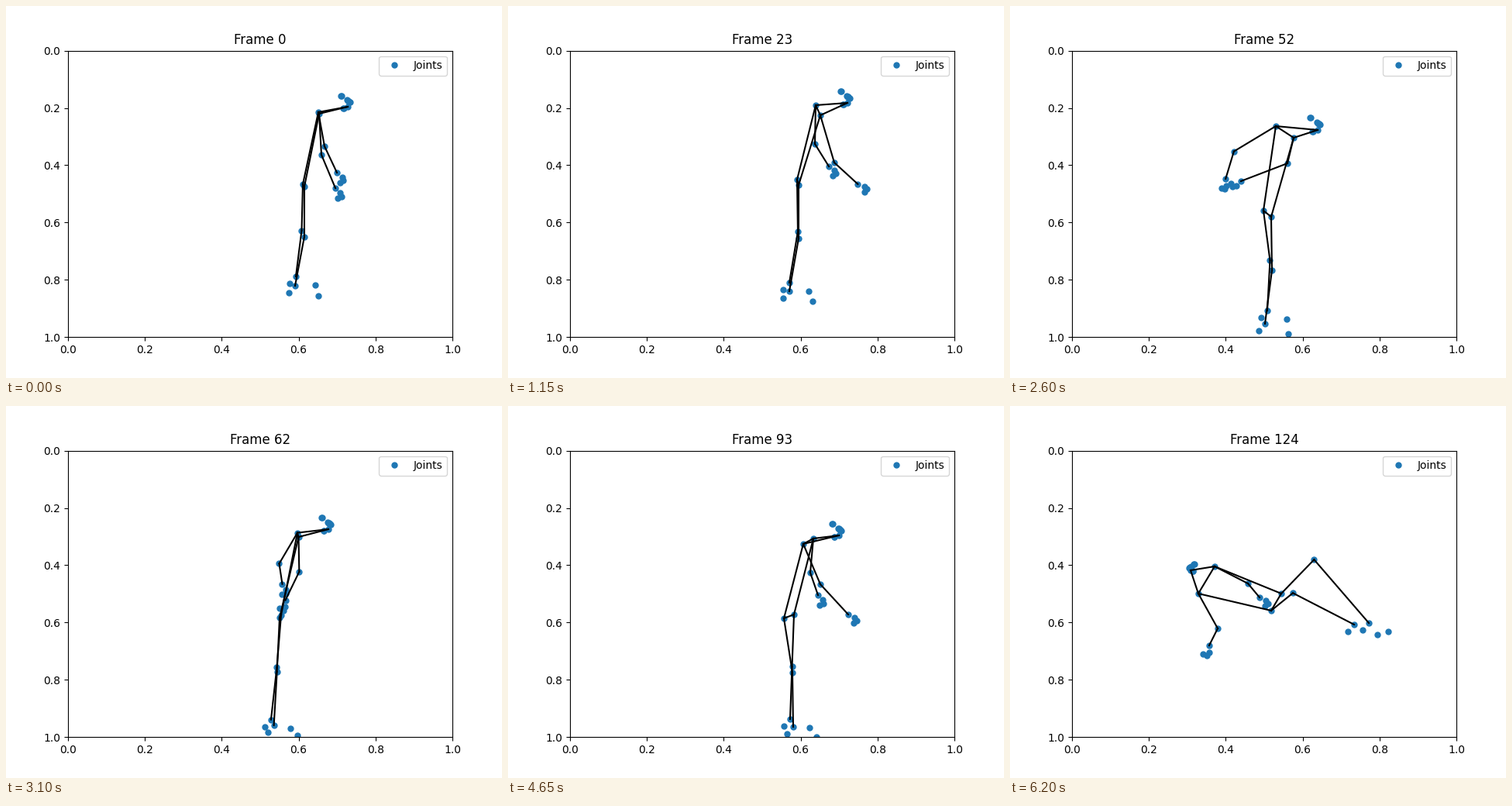
A matplotlib script that plays this animation: 640 by 480 pixels, repeating every 6.25 s.

```python
import numpy as np
import matplotlib.pyplot as plt
from matplotlib.animation import FuncAnimation

FRAMES, INTERVAL = 125, 50
KEYS = np.array([0, 23, 52, 72, 93, 105, 124.0])
T = np.arange(FRAMES)
jump = np.clip((T - KEYS[-2]) / (KEYS[-1] - KEYS[-2]), 0, 1)
leap = np.sin(np.pi * jump)
planted = np.where(jump > 0, KEYS[-2] + (KEYS[-1] - KEYS[-2]) * jump ** 4, T)


def ease(vals, t=T):
    """Monotone cubic through one value per key time."""
    v, h = np.array(vals, float), np.diff(KEYS)
    d = np.diff(v) / h
    a, b = d[:-1], d[1:]
    same = a * b > 0
    mid = np.where(same, 2 * a * b / np.where(same, a + b, 1), 0)
    m = np.concatenate(([d[0]], mid, [d[-1]]))
    i = np.clip(np.searchsorted(KEYS, t, side="right") - 1, 0, len(h) - 1)
    s = (t - KEYS[i]) / h[i]
    return ((1 + 2 * s) * (1 - s) ** 2 * v[i] + s * (1 - s) ** 2 * h[i] * m[i]
            + s * s * (3 - 2 * s) * v[i + 1] + s * s * (s - 1) * h[i] * m[i + 1])


def track(*points, lift=0, t=T):
    """Path through stage pixels, raised by lift while leaping."""
    x, y = zip(*points)
    return np.column_stack([ease(x, t), ease(y, t) - lift * leap])


def pulse(centre, width, dx, dy):
    return np.outer(np.exp(-((T - centre) / width) ** 2), (dx, dy))


def axes_of(a, b):
    """Unit vectors along a-b and across it."""
    u = (b - a) / np.linalg.norm(b - a, axis=1, keepdims=True)
    return u, np.column_stack([u[:, 1], -u[:, 0]])


def add_hand(side):
    wrist = joints[side + "wrist"]
    along, across = axes_of(joints[side + "elbow"], wrist)
    for name, a, c in (("index", 13, 3), ("pinky", 13, -2), ("thumb", 8, 3.5)):
        joints[side + name] = wrist + a * along + c * across


def add_leg(side, bend, toe):
    hip, ankle = joints[side + "hip"], joints[side + "ankle"]
    _, forward = axes_of(hip, ankle)
    share = 0.5 - 0.28 * jump ** 2
    bow = ease(bend) * (1 - leap)
    joints[side + "knee"] = hip + share[:, None] * (ankle - hip) + bow[:, None] * forward
    joints[side + "heel"] = ankle + (-8, 9)
    joints[side + "toe"] = ankle + toe


def add_face():
    nose = joints["nose"]
    neck = (joints["l_shoulder"] + joints["r_shoulder"]) / 2
    facing = (nose - neck)[:, :1] / 39
    scale = np.hstack([facing, abs(facing)])
    spots = [(-9, -15), (-8, -15), (-6, 2), (-5.5, 2)]
    spots += [(-1 + 0.8 * n, -9 + 0.6 * n) for n in range(6)]
    for n, spot in enumerate(spots):
        joints[f"face_{n}"] = nose + scale * spot


joints = {
    "nose": track((441, 130), (438, 125), (397, 160), (435, 158), (427, 167),
                  (401, 294), (233, 212), lift=110),
    "l_shoulder": track((403, 137), (397, 128), (343, 155), (409, 169), (394, 171),
                        (362, 264), (264, 207), lift=90),
    "r_shoulder": track((404, 139), (403, 141), (366, 170), (389, 168), (381, 178),
                        (358, 278), (243, 242), lift=90),
    "l_elbow": track((411, 181), (396, 178), (290, 188), (415, 216), (390, 215),
                     (321, 248), (307, 229), lift=125),
    "r_elbow": track((407, 192), (421, 202), (358, 203), (400, 226), (403, 230),
                     (311, 259), (268, 287), lift=125),
    "l_wrist": track((427, 215), (414, 207), (281, 224), (432, 235), (400, 244),
                     (275, 241), (322, 247), lift=160),
    "r_wrist": track((425, 235), (451, 230), (298, 226), (428, 275), (439, 269),
                     (263, 244), (257, 309), lift=160),
    "l_hip": track((383, 230), (373, 224), (327, 264), (383, 272), (369, 269),
                   (309, 329), (350, 242), lift=45),
    "r_hip": track((385, 233), (375, 231), (337, 272), (369, 274), (356, 274),
                   (302, 342), (337, 264), lift=45),
    "l_ankle": track((374, 349), (363, 357), (332, 393), (355, 411), (364, 404),
                     (355, 383), (463, 280), t=planted),
    "r_ankle": track((373, 361), (363, 368), (329, 410), (364, 413), (368, 414),
                     (339, 406), (444, 282), t=planted),
}

# arm swings between the main poses
joints["r_wrist"] += pulse(13, 5, 20, -12)
for part, reach in (("elbow", 0.4), ("wrist", 1)):
    joints["l_" + part] += pulse(45, 4, -60 * reach, -20 * reach)

for side in ("l_", "r_"):
    add_hand(side)
add_leg("l_", bend=(3, 6, 6, -4, 0, 53, 55), toe=(25, 11))
add_leg("r_", bend=(6, 6, 5, -4, 5, 59, 27), toe=(30, 13))
add_face()

names = list(joints)
paths = np.stack([joints[n] for n in names], axis=1)
paths = (paths - (80, 57.6)) / (496, 369.6)

bones = [("nose", "l_shoulder"), ("nose", "r_shoulder"),
         ("l_shoulder", "r_shoulder"), ("l_hip", "r_hip")]
for side in ("l_", "r_"):
    for chain in (("shoulder", "elbow", "wrist"), ("shoulder", "hip", "knee", "ankle")):
        bones += [(side + a, side + b) for a, b in zip(chain, chain[1:])]
links = [(names.index(a), names.index(b)) for a, b in bones]

fig, ax = plt.subplots(figsize=(6.4, 4.8), dpi=100)
ax.set_xlim(0, 1)
ax.set_ylim(1, 0)
dots, = ax.plot([], [], "o", ms=5, color="tab:blue", label="Joints")
limbs = [ax.plot([], [], "k-")[0] for _ in links]
ax.legend(loc="upper right")
title = ax.set_title("Frame 0")


def update(i):
    pose = paths[i]
    dots.set_data(pose[:, 0], pose[:, 1])
    for limb, (a, b) in zip(limbs, links):
        limb.set_data(pose[[a, b], 0], pose[[a, b], 1])
    title.set_text(f"Frame {i}")
    return [dots, title, *limbs]


anim = FuncAnimation(fig, update, frames=FRAMES, interval=INTERVAL, repeat=True, blit=False)
plt.show()
```
